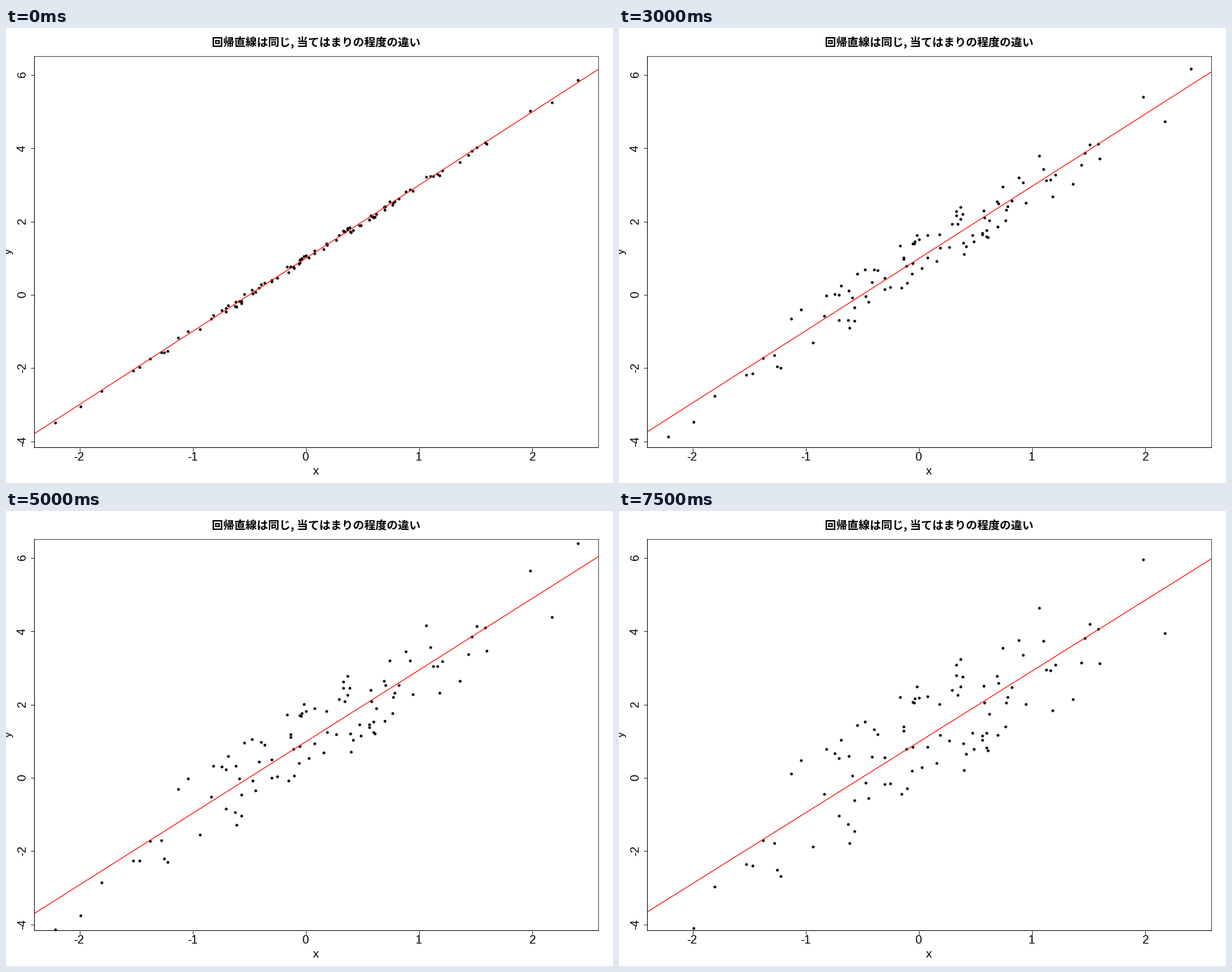
Write a matplotlib script that moves like this. It is 864 by 648 pixels and loops after 8000 ms.

```python
import math
import random

import matplotlib.pyplot as plt
import numpy as np
from matplotlib.animation import FuncAnimation

W, H = 864, 648
LEFT, RIGHT, TOP, BOTTOM = 40.4, 843.4, 40.32, 597.6
Y_MIN, Y_MAX = -4.171, 6.511
N, FRAMES, INTERVAL = 100, 16, 500
MASK = 0xFFFFFFFF


def uniform_source(seed):
    """Mersenne Twister seeded by a linear congruential scramble, as R does."""
    key = []
    for step in range(675):
        seed = (69069 * seed + 1) & MASK
        if step > 50:
            key.append(seed)
    gen = random.Random()
    gen.setstate((3, tuple(key) + (624,), None))
    return lambda: gen.getrandbits(32) / 2**32


def normal_quantile(p):
    lo, hi = -7.0, 7.0
    for _ in range(50):
        mid = (lo + hi) / 2
        if 0.5 * math.erfc(-mid / math.sqrt(2)) < p:
            lo = mid
        else:
            hi = mid
    return (lo + hi) / 2


def normals(seed, n):
    big = 2**27
    unif = uniform_source(seed)
    return np.array([normal_quantile((int(big * unif()) + unif()) / big)
                     for _ in range(n)])


def uniforms(seed, n):
    unif = uniform_source(seed)
    return np.array([2 * unif() - 1 for _ in range(n)])


x = normals(1, N)
noise = uniforms(2, N)
pad = 0.04 * np.ptp(x)
x_lim = np.array([x.min() - pad, x.max() + pad])

# At 72 dpi one point is one pixel.
plt.rcParams["font.family"] = "Liberation Sans"
plt.rcParams["axes.unicode_minus"] = False
fig = plt.figure(figsize=(W / 72, H / 72), dpi=72, facecolor="white")
ax = fig.add_axes([LEFT / W, 1 - BOTTOM / H, (RIGHT - LEFT) / W, (BOTTOM - TOP) / H])
ax.set(xlim=x_lim, ylim=(Y_MIN, Y_MAX), xticks=range(-2, 3), yticks=range(-4, 7, 2))
ax.tick_params(length=5, width=0.75, labelbottom=False, labelleft=False)
for side, spine in ax.spines.items():
    spine.set(linewidth=0.9 if side in ("left", "bottom") else 0.65, snap=False)
for tick in ax.get_xticklines() + ax.get_yticklines():
    tick.set_snap(False)


def label(px, py, text, **style):
    style = {"fontsize": 16.8, "ha": "center", "va": "baseline",
             "rotation_mode": "anchor", **style}
    fig.text(px / W, 1 - py / H, text, **style)


def to_px(value, limits, start, end):
    return start + (value - limits[0]) / (limits[1] - limits[0]) * (end - start)


for v in range(-2, 3):
    label(to_px(v, x_lim, LEFT, RIGHT) - 0.5, 616, str(v))
for v in range(-4, 7, 2):
    label(28, to_px(v, (Y_MIN, Y_MAX), BOTTOM, TOP) - 0.5, str(v), rotation=90)
mid_x, mid_y = (LEFT + RIGHT) / 2, (TOP + BOTTOM) / 2
label(mid_x - 0.8, 635.5, "x")
label(8, mid_y, "y", rotation=90)
label(mid_x - 0.8, 25.5, "回帰直線は同じ, 当てはまりの程度の違い",
      fontsize=16, fontfamily="Noto Sans CJK JP", fontweight="bold")

# A scatter keeps the dots at sub-pixel positions.
dots = ax.scatter(x, x, s=4**2, color="black", linewidths=0, zorder=1.5)
fit, = ax.plot([], [], color="red", lw=1.1)
ax.set(xlim=x_lim, ylim=(Y_MIN, Y_MAX))


def update(k):
    y = 1 + 2 * x + 0.1 * (k + 1) * noise
    slope, intercept = np.polyfit(x, y, 1)
    dots.set_offsets(np.column_stack([x, y]))
    fit.set_data(x_lim, intercept + slope * x_lim)
    return dots, fit


anim = FuncAnimation(fig, update, frames=FRAMES, interval=INTERVAL,
                     repeat=True, repeat_delay=0)
plt.show()
```
